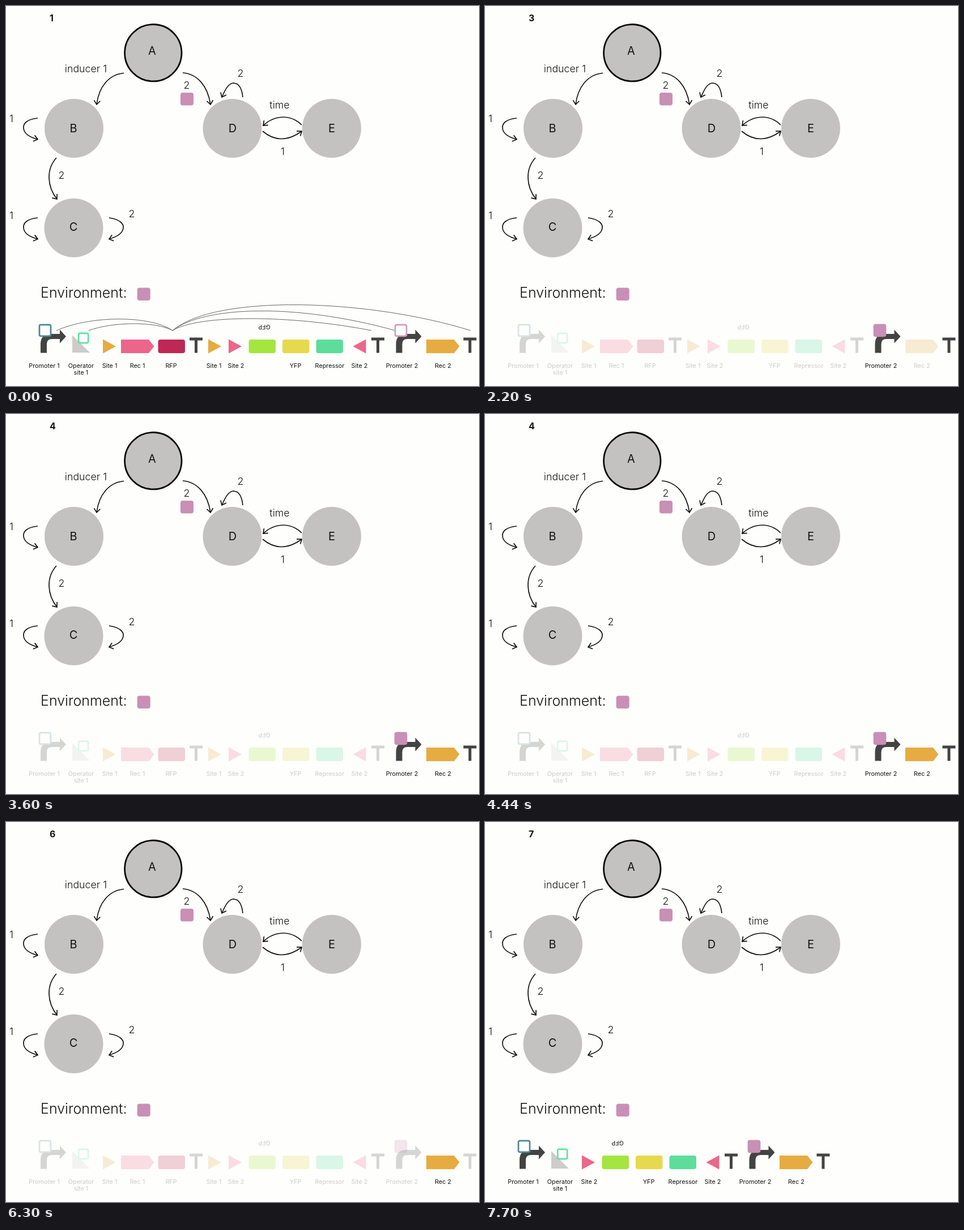
These frames come from a looping animation (835 by 671 pixels, 8 s). An HTML page:

```html
<!DOCTYPE html>
<html lang="en">
<head>
<meta charset="utf-8">
<title>Genetic state machine</title>
<style>
  html, body { margin: 0; width: 100%; height: 100%; overflow: hidden; background: #fefefc; }
  svg { display: block; width: 835px; height: 671px; font-family: Inter, "Open Sans", sans-serif; fill: #111; }
  .arrow { fill: none; stroke: #111; stroke-width: 1.7; }
  .arc { fill: none; stroke: #666; stroke-width: 1; }
  .mid { text-anchor: middle; }
  .light { font-weight: 300; }
  .small { font-size: 10.8px; text-anchor: middle; }
</style>
</head>
<body>
<svg id="stage" viewBox="0 0 835 671">
  <defs>
    <marker id="head" markerUnits="userSpaceOnUse" markerWidth="14" markerHeight="14" refX="9" refY="7" orient="auto">
      <path d="M2 1.5 L9 7 L2 12.5" class="arrow"/>
    </marker>
  </defs>
</svg>
<script>
const LOOP = 8000;
const FADE = 0.215;
const CUT_SHIFT = -222;
const PAPER = '#fefefc', PINK = '#c98fb5', ORANGE = '#e6ab41', ROSE = '#ec668b', DARK = '#434343';
const stage = document.getElementById('stage');

function add(parent, tag, attrs, content) {
  const el = document.createElementNS('http://www.w3.org/2000/svg', tag);
  for (const key in attrs) el.setAttribute(key, attrs[key]);
  if (content !== undefined) el.textContent = content;
  parent.appendChild(el);
  return el;
}

const text = (parent, x, y, content, attrs) => add(parent, 'text', { x, y, ...attrs }, content);
const shape = (parent, d, fill) => add(parent, 'path', { d, fill });
const square = (x, y) => add(stage, 'rect', { x, y, width: 23, height: 22.5, rx: 4, fill: PINK });

// State diagram
const counter = text(stage, 77, 27, '', { 'font-size': 16, 'font-weight': 700 });

for (const [name, x, y, labelX, labelY] of [
  ['A', 259.8, 82.7, 258, 86], ['B', 120, 216, 119, 223], ['C', 119.5, 391.8, 119, 397],
  ['D', 399.5, 216, 400, 223], ['E', 575, 216, 575, 223],
]) {
  const ring = name === 'A' ? { r: 50.2, stroke: '#080808', 'stroke-width': 2.8 } : { r: 52 };
  add(stage, 'circle', { cx: x, cy: y, fill: '#c3c2c1', ...ring });
  text(stage, labelX, labelY, name, { class: 'mid', 'font-size': 20 });
}

for (const d of [
  'M208 118.5 C181 121 164 143 160 174',
  'M312 118 C338 120 356 141 361 174',
  'M418 161 C416 142 409 136 401 136 C392 137 387 148 381 161',
  'M522 210 C504 192 476 191 454 211',
  'M453 221 C474 239 498 239 522 221',
  'M56 198 C36 200 30 208 31 216 C32 226 43 232 56 235.5',
  'M56 374 C36 376 30 384 31 392 C32 402 43 408 56 411.5',
  'M182 374 C202 377 208 385 207 392 C206 402 194 408 182 411.5',
  'M89 268 C71 288 72 318 90 341',
]) add(stage, 'path', { d, class: 'arrow', 'marker-end': 'url(#head)' });

for (const [x, y, label] of [
  [141, 117, 'inducer 1'], [319, 146, '2'], [414, 125, '2'], [483, 181, 'time'], [488.5, 263, '1'],
  [9.5, 205, '1'], [98, 305, '2'], [9.5, 376, '1'], [222, 373, '2'],
]) text(stage, x, y, label, { class: 'mid light', 'font-size': 17.8 });

square(308, 153);
text(stage, 61, 515, 'Environment:', { class: 'light', 'font-size': 25 });
square(231.7, 497.5);

// Interactions drawn as thin arcs meeting at the RFP gene
const arcs = add(stage, 'g', {});
for (const d of [
  'M89 573 C150 546 255 546 294 573',
  'M146 573 C190 557 265 557 294 573',
  'M294 573 C340 545 500 545 645 573',
  'M294 573 C350 530 510 524 687 573',
  'M294 573 C370 508 640 517 820 573',
]) add(arcs, 'path', { d, class: 'arc' });

// Gene circuit
const parts = {};
const leftEnd = add(stage, 'g', {});
const excised = add(stage, 'g', {});
const rightEnd = add(stage, 'g', {});

function part(parent, id, labelX, ...lines) {
  const g = parts[id] = add(parent, 'g', {});
  lines.forEach((line, i) => text(g, labelX, 638.5 + 12.5 * i, line, { class: 'small' }));
  return g;
}

const promoter = (g, x) => shape(g, `M${x} 612.5 V597 Q${x} 579 ${x + 18} 579 H${x + 34} V571.5 L${x + 45} 583.5
  L${x + 34} 595.5 V588 H${x + 20} Q${x + 11} 588 ${x + 11} 597 V612.5 Z`, DARK);
const ligandBox = (g, x, y, size, stroke) =>
  add(g, 'rect', { x, y, width: size, height: size, rx: 2.5, fill: PAPER, stroke, 'stroke-width': 2.7 });
const site = (g, x, dir, fill) => shape(g, `M${x} 588.5 L${x + 23 * dir} 601 L${x} 613.5 Z`, fill);
const enzyme = (g, x, fill) => shape(g, `M${x} 589 H${x + 49} L${x + 58.5} 601 L${x + 49} 613 H${x} Z`, fill);
const gene = (g, x, fill) => add(g, 'rect', { x, y: 589, width: 47.5, height: 24, rx: 4, fill });
const terminator = (g, x) => shape(g, `M${x} 585.5 H${x + 23} V590.5 H${x + 14} V612.5 H${x + 9} V590.5 H${x} Z`, DARK);

const promoter1 = part(leftEnd, 'promoter1', 67.5, 'Promoter 1');
promoter(promoter1, 61);
ligandBox(promoter1, 59, 562.8, 20, '#4d8790');
const operator = part(leftEnd, 'operator', 132.5, 'Operator', 'site 1');
shape(operator, 'M117 581 V612 H148 Z', '#cdcccb');
ligandBox(operator, 128.2, 577.8, 17, '#5fe0a2');

site(part(excised, 'site1a', 183, 'Site 1'), 171, 1, ORANGE);
enzyme(part(excised, 'rec1', 232, 'Rec 1'), 203, ROSE);
gene(part(excised, 'rfp', 291.5, 'RFP'), 268.5, '#bf2855');
terminator(part(excised, 'term1'), 324);
site(part(excised, 'site1b', 367, 'Site 1'), 357, 1, ORANGE);

site(part(rightEnd, 'site2a', 406, 'Site 2'), 393, 1, ROSE);
const gfp = part(rightEnd, 'gfp');
gene(gfp, 428.5, '#a5e540');
text(gfp, 456, 571, 'GFP', { class: 'small', transform: 'rotate(180 456 567)' });
gene(part(rightEnd, 'yfp', 511, 'YFP'), 488, '#e7d94e');
gene(part(rightEnd, 'repressor', 571.5, 'Repressor'), 547.5, '#5cdd9b');
site(part(rightEnd, 'site2b', 624, 'Site 2'), 635.5, -1, ROSE);
terminator(part(rightEnd, 'term2'), 645);
promoter(part(rightEnd, 'promoter2', 699, 'Promoter 2'), 688.5);
const inducerBox = ligandBox(part(rightEnd, 'inducer'), 687, 562.8, 20, PINK);
enzyme(part(rightEnd, 'rec2', 771.5, 'Rec 2'), 742, ORANGE);
terminator(part(rightEnd, 'term3'), 807.5);

// A step without "lit" shows every part at full strength
const steps = [
  { start: 0, arcs: true, outline: '#d09abe' },
  { start: 900, outline: '#b0629a', lit: ['inducer'] },
  { start: 2200, lit: ['inducer', 'promoter2', 'term3'] },
  { start: 3600, lit: ['inducer', 'promoter2', 'term3', 'rec2'] },
  { start: 5000 },
  { start: 6300, lit: ['rec2'] },
  { start: 7700, cut: true },
];

function render(time) {
  const index = steps.findLastIndex(step => step.start <= time);
  const { lit, outline, cut, arcs: showArcs } = steps[index];
  counter.textContent = index + 1;
  for (const id in parts) parts[id].setAttribute('opacity', !lit || lit.includes(id) ? 1 : FADE);
  inducerBox.setAttribute('fill', outline ? PAPER : PINK);
  inducerBox.setAttribute('stroke', outline || PINK);
  arcs.setAttribute('display', showArcs ? 'inline' : 'none');
  excised.setAttribute('display', cut ? 'none' : 'inline');
  rightEnd.setAttribute('transform', `translate(${cut ? CUT_SHIFT : 0})`);
}

const origin = performance.now();
function tick() {
  render((performance.now() - origin) % LOOP);
  requestAnimationFrame(tick);
}
tick();
</script>
</body>
</html>
```
